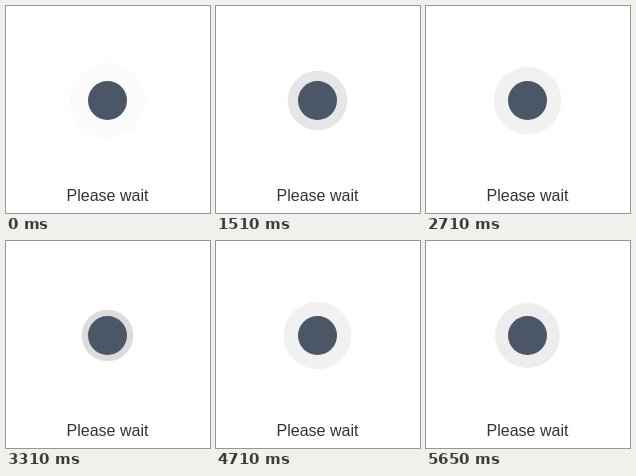
These frames come from a looping animation (204 px wide and 207 px high, 5.85 s). An HTML page:

```html
<!DOCTYPE html>
<html lang="en">
<head>
<meta charset="utf-8">
<title>Please wait</title>
<style>
  html, body { margin: 0; width: 100%; height: 100%; overflow: hidden; background: #fff; }
  svg { display: block; }
  text { font: 16px "Liberation Sans", Arial, sans-serif; fill: #333; text-anchor: middle; }
</style>
</head>
<body>
<svg width="204" height="207" viewBox="0 0 204 207">
  <circle id="ring" cx="101.5" cy="94.5" r="19.5"/>
  <circle cx="101.5" cy="94.5" r="19.5" fill="#4b5666"/>
  <text x="101.5" y="195">Please wait</text>
</svg>
<script>
  const LOOP = 5850, PULSE = 1000, STEP = 1000 / 15;
  const DOT_RADIUS = 19.5, SPREAD = 20, SHADOW_ALPHA = 0.2;
  const ring = document.getElementById('ring');

  // Pulse progress 0..1, sampled at 15 steps per second.
  function pulseAt(time) {
    if (time < 70) return 0.925; // tail of the pulse cut by the loop
    const sampled = 650 + Math.floor((time - 638) / STEP) * STEP;
    return (sampled % PULSE) / PULSE;
  }

  function draw(now) {
    const progress = pulseAt(now % LOOP);
    ring.setAttribute('r', DOT_RADIUS + SPREAD * progress);
    ring.setAttribute('fill-opacity', SHADOW_ALPHA * (1 - progress));
    requestAnimationFrame(draw);
  }
  draw(0);
</script>
</body>
</html>
```
